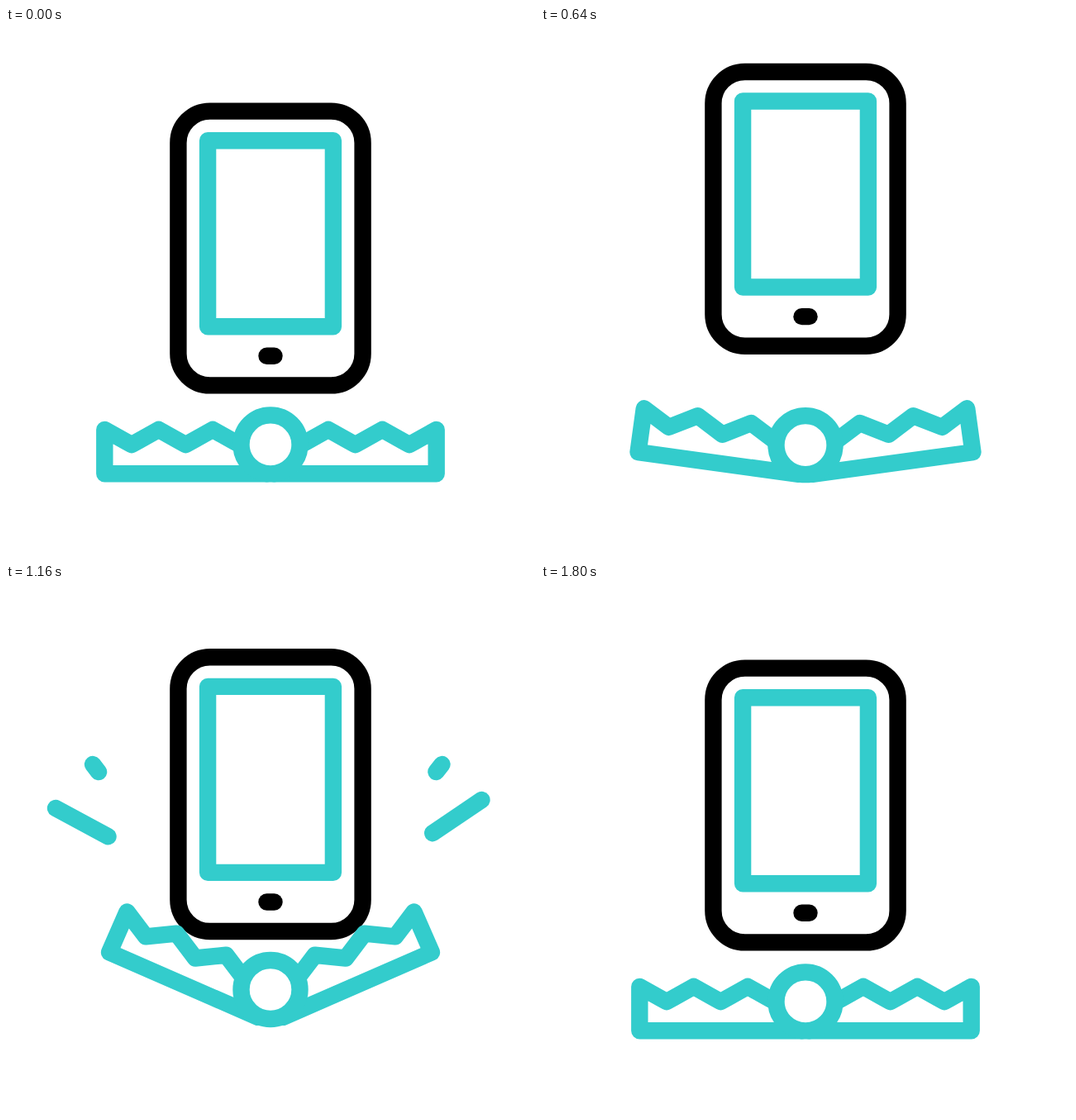
These frames come from a looping animation (640x640 px, 2 s). An HTML page:

```html
<!DOCTYPE html>
<html lang="en">
<head>
<meta charset="utf-8">
<title>Phone trap</title>
<style>
  html, body { margin: 0; width: 100%; height: 100%; overflow: hidden; background: #fff; }
  svg { display: block; width: 100vw; height: 100vh; }
</style>
</head>
<body>
<svg viewBox="0 0 640 640" fill="none" stroke="#33cccc" stroke-width="20.4" stroke-linecap="round" stroke-linejoin="round">
  <defs><path id="jaw"/></defs>
  <g id="phone">
    <rect x="208.4" y="100.6" width="223.2" height="331.8" rx="38.3" stroke="#000"/>
    <rect x="244.1" y="136.2" width="151.8" height="225"/>
    <path d="M315.5 396.8h9" stroke="#000"/>
  </g>
  <g id="trap">
    <use id="left" href="#jaw"/>
    <g transform="scale(-1 1)"><use id="right" href="#jaw"/></g>
    <circle r="35.5" fill="#fff"/>
  </g>
  <g id="sparks"></g>
</svg>
<script>
const LOOP = 2000, STEP = 40;
const $ = id => document.getElementById(id);

// Each move: start time, end time, pose reached.
const phoneMoves = [
  { from: 200, to: 440, y: 26.2 },
  { from: 440, to: 728, y: -61.7 },
  { from: 1000, to: 1320, y: 17.5 },
  { from: 1320, to: 1800, y: 0 }
];
const trapMoves = [
  { from: 200, to: 490, y: 13, turn: -5 },
  { from: 560, to: 860, y: -31.2, turn: 41 },
  { from: 1000, to: 1475, y: 13, turn: -5 },
  { from: 1475, to: 1800, y: 0, turn: 0 }
];

const smooth = s => s * s * (3 - 2 * s);
const progress = (t, start, length) => Math.min(1, Math.max(0, (t - start) / length));

// Runs through the moves with a quick start and a longer settling.
function pose(moves, key, t) {
  return moves.reduce((v, m) => {
    const p = smooth(progress(t, m.from, m.to - m.from) ** 0.8);
    return v + (m[key] - v) * p;
  }, 0);
}

const tooth = "l32.7 18.3 32.7 -18.3";
$("jaw").setAttribute("d", "M-4.7 35.4H-200.7V-18" + tooth.repeat(2) + "l32.7 18.3");

function addSpark(x0, y0, x1, y1, delay) {
  const el = document.createElementNS("http://www.w3.org/2000/svg", "path");
  $("sparks").append(el);
  const at = p => `${x0 + (x1 - x0) * p} ${y0 + (y1 - y0) * p}`;
  return t => {
    const head = smooth(progress(t - delay, 800, 240));
    const tail = smooth(progress(t - delay, 1000, 200));
    el.setAttribute("d", head > tail ? `M${at(tail)}L${at(head)}` : "");
  };
}

const sparks = [
  addSpark(173, 305, 105, 217, 0),
  addSpark(459.5, 304.5, 527.5, 217, 0),
  addSpark(158, 323, 60, 270, 80),
  addSpark(484, 322, 575.5, 260, 80)
];

function draw(t) {
  const turn = `rotate(${pose(trapMoves, "turn", t)} -5 9)`;
  $("phone").setAttribute("transform", `translate(0 ${pose(phoneMoves, "y", t)})`);
  $("trap").setAttribute("transform", `translate(320 ${503.9 + pose(trapMoves, "y", t)})`);
  $("left").setAttribute("transform", turn);
  $("right").setAttribute("transform", turn);
  sparks.forEach(spark => spark(t));
}

const begin = performance.now();
function tick() {
  const t = (performance.now() - begin) % LOOP;
  draw(Math.floor(t / STEP) * STEP);
  requestAnimationFrame(tick);
}
draw(0);
requestAnimationFrame(tick);
</script>
</body>
</html>
```
